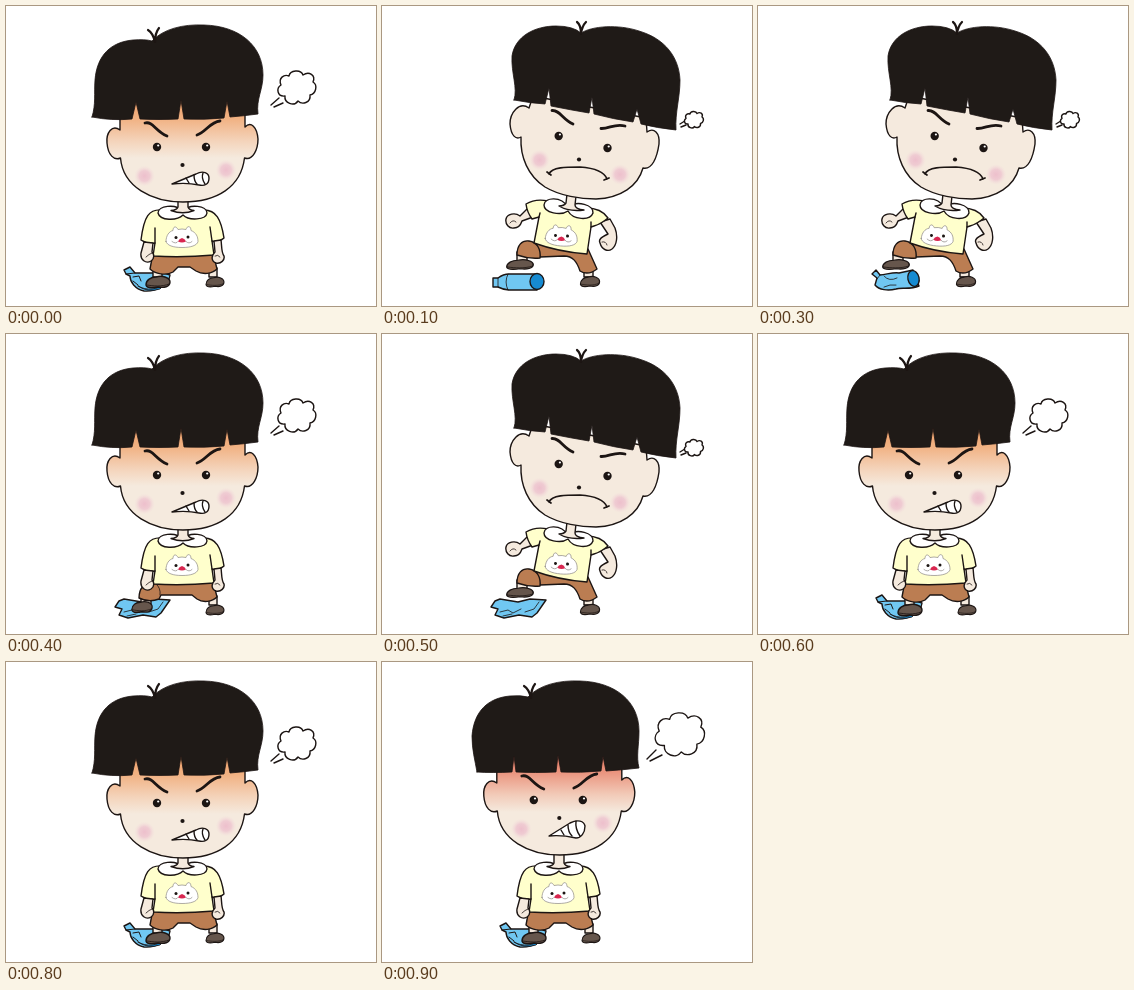
Recreate the animation shown at these times as an HTML page. Size 370x300 px, loop 1 s.

```html
<!DOCTYPE html>
<html lang="en">
<head>
<meta charset="utf-8">
<title>Bottle stomp</title>
<style>
html, body { margin: 0; width: 100%; height: 100%; overflow: hidden; background: #fff; }
svg { display: block; width: 370px; height: 300px; }
.ink { stroke: #1c1513; stroke-width: 1.4; stroke-linecap: round; stroke-linejoin: round; }
.line { fill: none; }
.brow { fill: none; stroke-width: 2.8; }
.tuft { fill: none; stroke-width: 2.2; }
.skin { fill: #f5eade; }
.white { fill: #fff; }
.shirt { fill: #ffffcc; }
.pants { fill: #bb7d52; }
.shoe { fill: #66564c; }
.hair { fill: #1f1a17; stroke-width: .8; }
.dot { fill: #1c1513; stroke: none; }
.blue { fill: #70c7f2; }
.deep { fill: #168bd2; }
.thin { stroke-width: .8; }
.faint { stroke: #8d8885; stroke-width: .7; }
.cloud { vector-effect: non-scaling-stroke; }
.step { animation: 1s step-end infinite; }
.press { animation-name: press; }
.lift { animation-name: lift; }
.calm { animation-name: calm; }
.rage { animation-name: rage; }
.stand { animation-name: stand; }
.stomp { animation-name: stomp; }
.whole { animation-name: whole; }
.dent { animation-name: dent; }
.flat { animation-name: flat; }
@keyframes press { 0%, 20%, 40%, 60%, 100% { opacity: 1 } 10%, 30%, 50% { opacity: 0 } }
@keyframes lift { 0%, 20%, 40%, 60%, 100% { opacity: 0 } 10%, 30%, 50% { opacity: 1 } }
@keyframes calm { 0%, 80%, 100% { opacity: 1 } 70%, 90% { opacity: 0 } }
@keyframes rage { 0%, 80%, 100% { opacity: 0 } 70%, 90% { opacity: 1 } }
@keyframes stand { 0%, 60%, 100% { opacity: 1 } 10% { opacity: 0 } }
@keyframes stomp { 0%, 60%, 100% { opacity: 0 } 10% { opacity: 1 } }
@keyframes whole { 0%, 20%, 100% { opacity: 0 } 10% { opacity: 1 } }
@keyframes dent { 0%, 40%, 100% { opacity: 0 } 20% { opacity: 1 } }
@keyframes flat { 0%, 60%, 100% { opacity: 0 } 40% { opacity: 1 } }
</style>
</head>
<body>
<svg viewBox="0 0 370 300" class="ink" fill="none">
  <defs>
    <linearGradient id="warm" gradientUnits="userSpaceOnUse" x1="0" y1="96" x2="0" y2="152">
      <stop offset="0" stop-color="#f0a26c"/><stop offset=".3" stop-color="#f1b283"/>
      <stop offset=".7" stop-color="#f4d4bb"/><stop offset="1" stop-color="#f5eade"/>
    </linearGradient>
    <linearGradient id="hot" gradientUnits="userSpaceOnUse" x1="0" y1="96" x2="0" y2="153">
      <stop offset="0" stop-color="#e5775f"/><stop offset=".3" stop-color="#ea947e"/>
      <stop offset=".7" stop-color="#f2cbb9"/><stop offset="1" stop-color="#f5eade"/>
    </linearGradient>
    <radialGradient id="pink">
      <stop offset="0" stop-color="#edbfcc"/><stop offset=".5" stop-color="#eec6d0" stop-opacity=".85"/>
      <stop offset="1" stop-color="#f4dedd" stop-opacity="0"/>
    </radialGradient>
    <circle id="cheek" r="10.5" fill="url(#pink)" stroke="none"/>
    <g id="eye">
      <circle class="dot" r="4.2"/><circle cx="1.2" cy="-1.5" r="1.1" fill="#fff" stroke="none"/>
    </g>
    <path id="puff" class="cloud white" d="M-8-12C-7-18 4-19 6-13C12-17 19-13 16-6C21-3 19 6 13 7C14 15 5 17 1 13C-3 19-13 15-12 8C-20 9-21 0-16-3C-19-10-13-14-8-12Z"/>
    <g id="shoe">
      <path class="shoe" d="M-12 3C-12-2-7-5-2-5C5-7 12-4 12 0C12 5 6 6 0 5C-5 6-11 7-12 3Z"/>
      <path class="line thin" d="M-11 3C-5 4 4 5 11 2"/>
    </g>
    <g id="badge">
      <path class="white faint" d="M-16 4C-16-2-13-6-9-7C-9-11-6-12-4-8Q0-9 4-8C5-12 9-12 9-7C14-5 16-1 16 4C15 8 9 10 0 10C-9 10-15 8-16 4Z"/>
      <circle class="dot" cx="-6" cy="0" r="1.5"/><circle class="dot" cx="6" cy="-.5" r="1.5"/>
      <path d="M-4 4Q-3 1 0 .5Q3 1 4 4Q0 6-4 4Z" fill="#d92750" stroke="none"/>
      <path class="line faint" d="M-10 4Q-6 7-4 4M4 4Q7 7 10 4"/>
    </g>
    <g id="face">
      <path d="M114 92V124C106 118 100 127 101 137C102 149 108 155 114.500 152C117 181 146 196 177 196C211 196 235 181 238.500 152C247 155 252 143 252 133C251 121 245 115 239 121V92Z"/>
      <use href="#cheek" x="138.500" y="170"/><use href="#cheek" x="220" y="164"/>
      <path class="brow" d="M139 117C147 115 149 125 161 130M191 129C200 126 204 116 214 115"/>
      <use href="#eye" x="151" y="141"/><use href="#eye" x="200" y="141"/>
      <circle class="dot" cx="176.500" cy="159" r="2.1"/>
    </g>
  </defs>

  <!-- bottle stages -->
  <g class="step whole">
    <path class="blue" d="M111 272H116C120 269 123 268 127 268H155V284H127C123 284 120 283 116 281H111Z"/>
    <path class="line thin" d="M116 272V281M126 268Q122 276 126 284"/>
    <ellipse class="deep" cx="155" cy="275.500" rx="7" ry="8"/>
  </g>
  <g class="step dent">
    <path class="blue" d="M114 268L118 264L122 269C130 268 136 266 141 267L155 264L161 280C152 284 143 281 138 283C130 285 121 284 117 279L119 272Z"/>
    <path class="line thin" d="M122 269L119 273M126 270Q131 276 139 272M126 281Q132 278 138 279"/>
    <ellipse class="deep" cx="155.500" cy="272.500" rx="5.600" ry="8" transform="rotate(-12 155.500 272.500)"/>
  </g>
  <g class="step flat">
    <path class="blue" d="M113 267L118 265L136 268L148 265L164 266L155 279L150 283L137 281L122 284L113 281L116 275L109 273Z"/>
    <path class="line thin" d="M118 278L126 276L131 279L139 275M143 278L152 275L157 268M121 282L130 280"/>
  </g>
  <g class="step stand">
    <path class="blue" d="M118 264L124 261L129 267L150 267L158 267L164 269C163 279 150 286 138 285C129 283 124 276 124 270L120 268Z"/>
    <path class="deep" d="M132 280C140 285 152 284 160 277L154 283Q142 287 132 280Z" stroke-width=".8"/>
    <path class="line" stroke-width="1" d="M120 268L129 267M127 271L133 270L135 275M127 275L132 279"/>
  </g>

  <!-- foot down -->
  <g class="step press">
    <g class="step stand">
      <path class="skin" d="M147 262H156V271H147ZM203 262H211V271H203Z"/>
      <use href="#shoe" x="152" y="276"/>
      <use href="#shoe" transform="translate(209 276) scale(.75 .85)"/>
      <path class="pants" d="M147 247L144 263C149 268 160 270 167 266L172 261H184L190 265C197 269 206 268 211 263L207 247Z"/>
    </g>
    <g class="step stomp">
      <path class="skin" d="M203 262H211V271H203ZM135 259H145V270H135Z"/>
      <use href="#shoe" transform="translate(209 276) scale(.75 .85)"/>
      <use href="#shoe" transform="translate(136 273) scale(.85 .95)"/>
      <path class="pants" d="M147 247C138 249 133 255 133 264Q143 269 153 265L155 261H186L191 265C197 269 206 268 211 263L207 247Z"/>
      <path class="line thin" d="M154 261Q155 254 150 250"/>
    </g>
    <path class="shirt" d="M156 204C143 203 138 210 135 234Q141 238 149 237L147 250Q176 252 208 249L206 235Q212 237 218 232C215 213 210 204 198 204Z"/>
    <path class="line" d="M149 237V222M206 235L204 221"/>
    <path class="skin" d="M138 236L135 247C134 254 140 258 145 255C149 252 148 248 146 246L147 237ZM208 235L209 246C205 250 205 255 210 257C215 258 219 254 218 250C215 246 216 240 215 234Z"/>
    <path class="line thin" d="M140 251Q143 248 146 247M209 250Q212 248 214 251"/>
    <path class="white" d="M177 205C169 197 152 200 152 207C154 215 171 215 177 209C183 215 200 214 201 207C201 200 184 197 177 205Z"/>
    <path class="skin" d="M172 191V201Q171 204 165 204.500Q177 209 188 204.500Q183 204 182 201V191Z"/>
    <use href="#badge" x="176" y="231.500"/>

    <g class="step calm">
      <use href="#face" fill="url(#warm)"/>
      <path class="white" d="M166 178L190 168C197 164 203 167 203 172C203 179 198 180 193 179C184 177 175 177 166 178Z"/>
      <path class="line" d="M180 172L183 177M188 169Q188 175 191 178M197 167Q195 172 199 178"/>
      <path class="hair" d="M86 111C90 98 88 88 89 74C91 49 105 36 127 34Q139 33 146 35C157 23 177 18 198 19C234 20 257 40 257 69C257 84 250 93 252 108Q237 110 224 111L221 95L218 112Q198 114 178 113L175 94L172 113Q153 114 134 113L130 96L126 113Q106 115 86 111Z"/>
      <path class="tuft" d="M149 36Q147 27 142 24M149 36Q149 27 153 22"/>
      <use href="#puff" x="291" y="82"/>
      <path class="line" d="M265 99L273 92M268 101L277 97"/>
    </g>
    <g class="step rage">
      <use href="#face" fill="url(#hot)" transform="translate(.8 -3)"/>
      <path class="white" d="M167 174L188 161C196 157 202 159 203 164C203 171 199 176 194 176C185 174 176 173 167 174Z"/>
      <path class="line" d="M179 168L182 173M186 163Q186 170 190 174M194 159Q193 167 198 174"/>
      <path class="hair" d="M95 110C93 98 90 88 90 74C92 49 106 36 128 34Q139 33 146 35C157 23 177 18 198 19C234 20 257 40 257 69C257 84 254 94 257 106Q240 108 224 109L221 94L219 109Q198 111 179 110L176 93L174 110Q153 111 134 110L132 94L130 110Q110 111 95 110Z"/>
      <path class="tuft" d="M149 36Q147 27 142 24M149 36Q149 27 153 22"/>
      <use href="#puff" transform="translate(298 73) scale(1.3)"/>
      <path class="line" d="M265 97L274 88M268 99L280 93"/>
    </g>
  </g>

  <!-- foot up -->
  <g class="step lift">
    <path class="skin" d="M147 201L138 210C133 206 125 208 124 213C123 218 127 223 132 222C137 222 139 218 140 215L151 211ZM218 216L226 228C220 231 216 233 218 237C220 244 226 246 230 243C235 239 236 230 233 222L228 213Z"/>
    <path class="line thin" d="M128 217Q131 213 134 216M220 236Q224 235 225 239"/>
    <path class="skin" d="M135 246H145V256H135ZM202 263H211V271H202Z"/>
    <use href="#shoe" transform="translate(138 258.500) scale(1.100 .85)"/>
    <use href="#shoe" transform="translate(208 275.500) scale(.8 .9)"/>
    <path class="pants" d="M154 237L158 251L182 250C191 250 195 256 198 265Q206 270 215 263L206 243Z"/>
    <path class="pants" d="M135 249C135 239 140 234 147 235C155 236 159 243 158 252Q146 253 135 249Z"/>
    <path class="shirt" d="M166 195C157 193 149 195 144 198Q145 206 150 213L157 211L152 237Q177 246 205 248L209 221L212 220Q219 218 226 212C222 206 214 202 204 202Z"/>
    <path class="line" d="M157 211L158 207M209 221V216"/>
    <path class="white" d="M186 201C179 190 163 191 162 199C162 207 179 210 186 205C191 214 208 215 211 207C212 199 195 194 186 201Z"/>
    <path class="skin" d="M185 188L184 197Q182 200 177 200Q187 206 202 204Q193 203 193 199L194 190Z"/>
    <use href="#badge" transform="translate(179.500 230) rotate(5)"/>

    <path class="skin" d="M151 90L147 102C137 95 128 107 128 118C129 130 134 134 139 131C138 151 146 170 163 181C178 190 199 193 214 193C239 192 256 180 261 162C270 164 275 152 277 138C278 127 272 121 265 126L264 112Z"/>
    <use href="#cheek" x="157.500" y="154"/><use href="#cheek" x="238" y="168.500"/>
    <path class="brow" d="M170 104.500C178 104 180 113 191 118M219 122.500C227 123 233 117 243 120"/>
    <use href="#eye" x="176.700" y="130"/><use href="#eye" x="225.500" y="142"/>
    <circle class="dot" cx="197" cy="153.500" r="2.1"/>
    <path class="line" stroke-width="1.7" d="M167 168C170 161 184 161 198 161C212 162 222 165 225 173M165 166L169 169M222 174L227 172"/>
    <path class="hair" d="M132 94C136 82 129 67 130 50C133 30 153 20 174 20Q191 20 199 27C210 20 236 18 257 25C284 33 297 52 298 74C298 92 293 106 294 124Q275 122 259 118L255 103L251 116Q231 113 212 108L210 91L207 107Q189 104 169 100L167 82L163 98Q147 97 132 94Z"/>
    <path class="tuft" d="M199 28Q199 19 195 16M199 28Q200 20 204 16"/>
    <use href="#puff" transform="translate(312 114) scale(.5)"/>
    <path class="line" d="M298 118L302 115.500M299 121L304 119"/>
  </g>
</svg>
</body>
</html>
```
